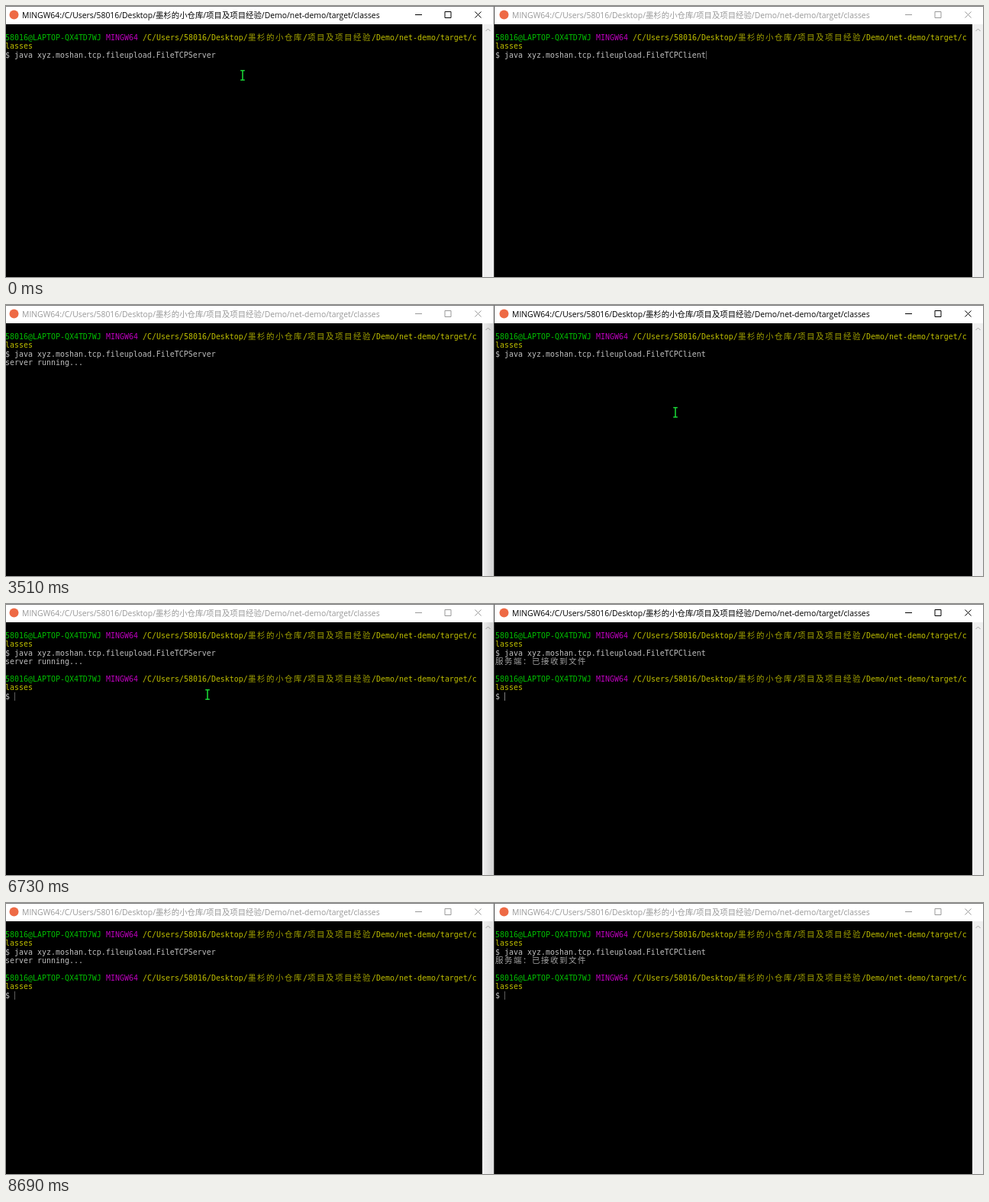
Write an HTML page that moves like this. It is 1280x356 px and loops after 8.73 s.

```html
<!DOCTYPE html>
<html lang="zh-CN">
<head>
<meta charset="utf-8">
<title>Terminals</title>
<style>
  html, body { margin: 0; width: 100%; height: 100%; overflow: hidden; background: #000; }
  svg { display: block; width: 1280px; height: 356px; }
  text { white-space: pre; }
  .title { font: 10.4px "Open Sans", "Noto Sans CJK SC", "Noto Sans CJK JP", sans-serif; }
  .mono { font: 9.966px "DejaVu Sans Mono", monospace; }
  .cjk { font: 300 10.5px "Noto Sans CJK SC", "Noto Sans CJK JP", sans-serif; letter-spacing: 1.5px; opacity: .85; }
</style>
</head>
<body>
<svg id="stage" viewBox="0 0 1280 356">
  <defs>
    <linearGradient id="shade">
      <stop offset="0" stop-color="#000" stop-opacity="0"/>
      <stop offset="1" stop-color="#000" stop-opacity=".13"/>
    </linearGradient>
  </defs>
</svg>
<script>
const LOOP = 8730, CELL = 6, ROW = 11.35, BLINK = 530;
const GREEN = "#00bf00", PINK = "#bf00bf", YELLOW = "#bfbf00", GRAY = "#bfbfbf";
const HOME = "/C/Users/58016/Desktop/";
const DIRS = ["墨杉的小仓库", "项目及项目经验"];

// Moments of the story, in ms.
const SERVER_RUN = 1310, CLICK = 2820, CLIENT_RUN = 4000, REPLY = 5100;
const SERVER_DONE = 6250, CLIENT_DONE = 6490, BLUR = 8570;

const stage = document.getElementById("stage");

function add(parent, tag, attrs, text) {
  const node = document.createElementNS("http://www.w3.org/2000/svg", tag);
  for (const key in attrs) node.setAttribute(key, attrs[key]);
  if (text) node.textContent = text;
  parent.append(node);
  return node;
}
const rect = (parent, x, y, width, height, fill) =>
  add(parent, "rect", { x, y, width, height, fill });
const show = (node, on) => node.setAttribute("visibility", on ? "visible" : "hidden");

// Text on the terminal grid; wide characters take two cells.
function write(parent, row, col, text, fill, wide) {
  add(parent, "text", {
    x: col * CELL - 1, y: Math.round(45.1 + row * ROW), fill, class: wide ? "cjk" : "mono"
  }, text);
  return col + text.length * (wide ? 2 : 1);
}

function prompt(parent, row) {
  const g = add(parent, "g", {});
  write(g, row, 0, "58016@LAPTOP-QX4TD7WJ", GREEN);
  write(g, row, 22, "MINGW64", PINK);
  let col = write(g, row, 30, HOME, YELLOW);
  col = write(g, row, col, DIRS[0], YELLOW, true);
  col = write(g, row, col, "/", YELLOW);
  col = write(g, row, col, DIRS[1], YELLOW, true);
  write(g, row, col, "/Demo/net-demo/target/c", YELLOW);
  write(g, row + 1, 0, "lasses", YELLOW);
  write(g, row + 2, 0, "$", GRAY);
  return g;
}

function makeWindow(left, command, reply, wide) {
  const g = add(stage, "g", { transform: `translate(${left} 0)` });
  rect(g, -2, 0, 641, 24, "#fff");
  rect(g, 624, 24, 15, 332, "#f0f0f0");
  add(g, "path", { d: "M628.5 33l3-3 3 3", fill: "none", stroke: "#a6a6a6" });
  add(g, "circle", { cx: 10.5, cy: 11.5, r: 6, fill: "#ee6a45" });
  const title = add(g, "text", { x: 21, y: 15.5, class: "title" },
    "MINGW64:" + HOME + DIRS.join("/") + "/Demo/net-demo/target/classes");
  const buttons = add(g, "path", {
    d: "M536 11.5h9M575 7.5h8v8h-8zM614.5 7.5l8 8m0-8l-8 8", fill: "none"
  });
  prompt(g, 0);
  write(g, 2, 2, command, GRAY);
  const answer = add(g, "g", {});
  write(answer, 3, 0, reply, GRAY, wide);
  const next = prompt(g, 5);
  const caret = rect(g, 0, 0, 1, 11, GRAY);
  return { title, buttons, answer, next, caret };
}

const server = makeWindow(0, "java xyz.moshan.tcp.fileupload.FileTCPServer", "server running...");
const shadow = rect(stage, 624, 24, 15, 332, "url(#shade)");
const client = makeWindow(642, "java xyz.moshan.tcp.fileupload.FileTCPClient", "服务端：已接收到文件", true);
rect(stage, 639, 0, 1, 356, "#3c3c3c");
rect(stage, 0, 0, 1280, 1, "#777");
const pointer = add(stage, "path", {
  d: "M-2.8 -6.3H2.8M0 -6.3V6.3M-2.8 6.3H2.8", fill: "none", stroke: "#18d034", "stroke-width": 1.6
});

// Each glide starts where the last one ended; `sag` bows it downwards.
const glides = [
  { from: 370, to: 450, x: 317, y: 91, sag: 9 },
  { from: 1920, to: 2090, x: 187, y: 120, sag: 0 },
  { from: 2090, to: 2410, x: 752, y: 142, sag: -70 },
  { from: 2410, to: 2770, x: 877, y: 141, sag: 11 },
  { from: 6120, to: 6450, x: 284, y: 112, sag: 26 },
  { from: 6450, to: 7210, x: 219, y: 135, sag: 0 },
  { from: 7250, to: 7490, x: 884, y: 226, sag: 0 },
  { from: 7670, to: 7810, x: 916, y: 292, sag: 0 }
];

const ramp = (t, a, b) => Math.min(1, Math.max(0, (t - a) / (b - a)));
const between = (t, a, b) => t >= a && t < b;
const blinkOn = (t, restart) => Math.floor((t - restart) / BLINK) % 2 === 0;

function pointAt(t) {
  let x = 310, y = 91;
  for (const g of glides) {
    if (t < g.from) break;
    const f = ramp(t, g.from, g.to), e = f * f * (3 - 2 * f);
    x += (g.x - x) * e;
    y += (g.y - y) * e + g.sag * Math.sin(Math.PI * e);
  }
  return [Math.round(x), Math.round(y)];
}

function setFocus(win, on) {
  win.title.setAttribute("fill", on ? "#000" : "#999");
  win.buttons.setAttribute("stroke", on ? "#000" : "#999");
  win.caret.setAttribute("fill", on ? "#7c7c7c" : "#5c5c5c");
}

function setCaret(win, on, row, col) {
  show(win.caret, on);
  win.caret.setAttribute("x", col * CELL - 1);
  win.caret.setAttribute("y", Math.round(36.4 + row * ROW));
}

// Typing and new output restart the blinking.
function clientCaret(t) {
  if (t < CLICK) return true;
  if (t < CLIENT_RUN) return blinkOn(t, 2980);
  if (t < REPLY) return blinkOn(t, 4120);
  return blinkOn(t, t < CLIENT_DONE ? 5060 : 6450);
}

function draw(t) {
  setFocus(server, t < CLICK);
  setFocus(client, between(t, CLICK, BLUR));
  shadow.setAttribute("opacity", ramp(t, CLICK, 3100) - 0.5 * ramp(t, BLUR, 8690));

  show(server.answer, t >= SERVER_RUN);
  show(server.next, t >= SERVER_DONE);
  show(client.answer, t >= REPLY);
  show(client.next, t >= CLIENT_DONE);

  if (t >= SERVER_DONE) setCaret(server, true, 7, 2);
  else setCaret(server, between(t, 160, 410), 2, 46);

  const [row, col] = t < CLIENT_RUN ? [2, 46] : t < REPLY ? [3, 0] : t < CLIENT_DONE ? [4, 0] : [7, 2];
  setCaret(client, clientCaret(t), row, col);

  // The pointer hides after each command is entered.
  show(pointer, t < SERVER_RUN || between(t, 1920, CLIENT_RUN) || between(t, 5390, 8040));
  const tick = Math.floor((t - 10) / 40) * 40 + 10;
  pointer.setAttribute("transform", `translate(${pointAt(tick)})`);
}

const start = performance.now();
function frame(now) {
  draw(Math.max(0, now - start) % LOOP);
  requestAnimationFrame(frame);
}
draw(0);
requestAnimationFrame(frame);
</script>
</body>
</html>
```
